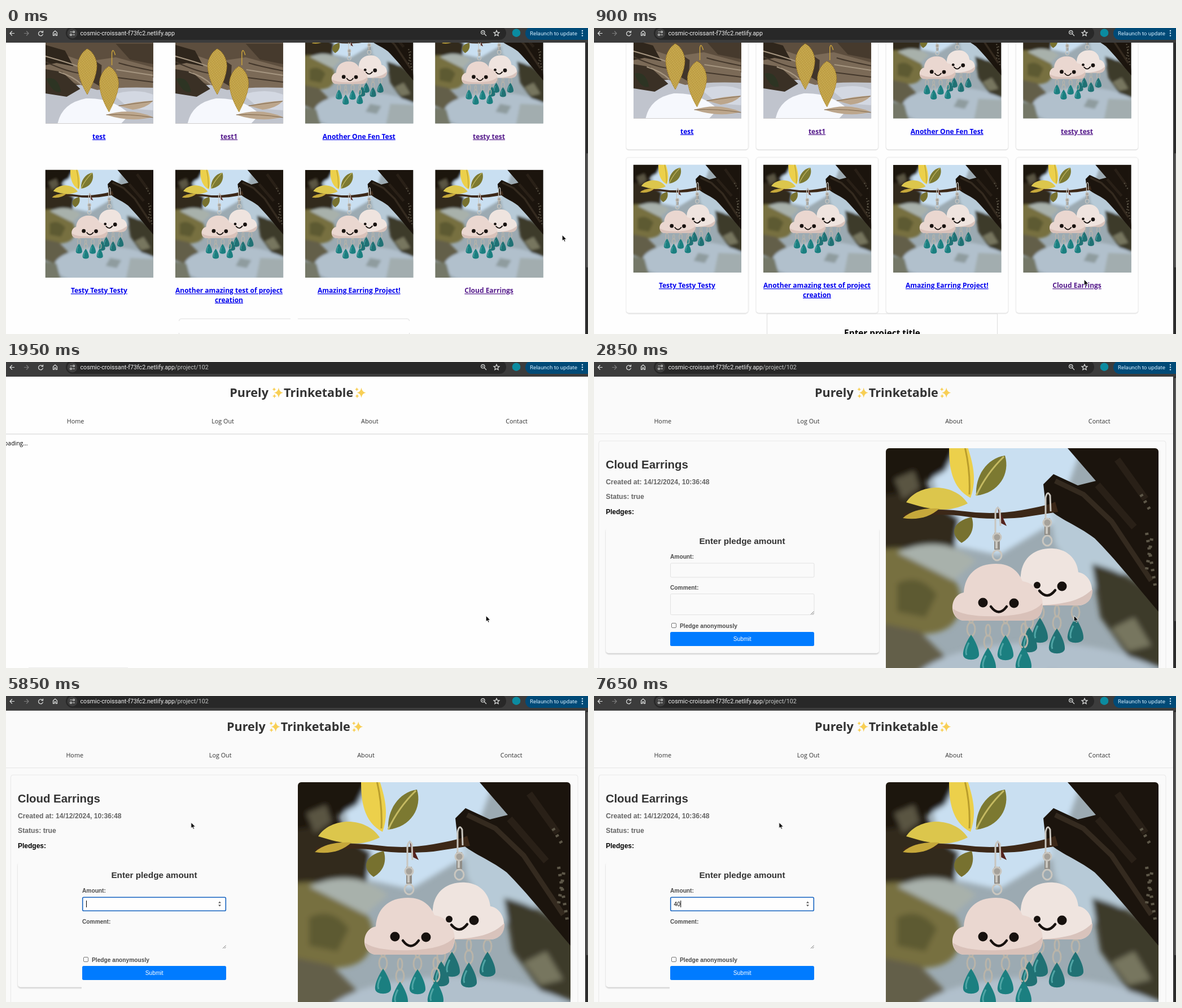
These frames come from a looping animation (1031 by 543 pixels, 8 s). An HTML page:

```html
<!DOCTYPE html>
<html lang="en">
<head>
<meta charset="utf-8">
<title>Earring projects</title>
<style>
html, body { margin: 0; width: 100%; height: 100%; overflow: hidden; background: #fefefe; }
svg { display: block; width: 100%; height: 100%; }
.open { font-family: "Open Sans", sans-serif; }
.arial { font-family: "Liberation Sans", Arial, sans-serif; }
.ui { font-family: Roboto, sans-serif; font-size: 10.7px; }
.mid { text-anchor: middle; }
.b { font-weight: 700; }
.link { font-weight: 700; font-size: 12px; text-decoration: underline; }
.icon { fill: none; stroke: #dfe1e0; stroke-width: 1.2; }

/* 8 s loop, hard cuts: 1% = 80 ms */
.t { animation: 8s step-end infinite; }
#gallery { animation-name: gallery; }
#scroll { animation-name: scroll; }
.frame { animation-name: after-scroll; }
#gap { animation-name: before-scroll; }
#hover { animation-name: hover; }
#status { animation-name: status; }
#loading { animation-name: loading; }
#project { animation-name: project; }
#path { animation-name: path; }
.focus { animation-name: focus; }
#caret { animation-name: caret; }
#four { animation-name: four; }
#zero { animation-name: zero; }
#pointer { animation-name: move; }
#arrow { animation-name: arrow; }
#hand { animation-name: hand; }
#beam { animation-name: beam; }

@keyframes gallery { 0% { opacity: 1 } 24.375% { opacity: 0 } }
@keyframes scroll { 0% { transform: translateY(9px) } 1.875% { transform: none } }
@keyframes after-scroll { 0% { opacity: 0 } 1.875% { opacity: 1 } }
@keyframes before-scroll { 0% { opacity: 1 } 1.875% { opacity: 0 } }
@keyframes hover { 0% { fill: #551a8b } 22.5% { fill: #f00 } }
@keyframes status { 0% { opacity: 0 } 22.5% { opacity: 1 } 35.625% { opacity: 0 } }
@keyframes loading { 0% { opacity: 0 } 24.375% { opacity: 1 } 35.625% { opacity: 0 } }
@keyframes project { 0% { opacity: 0 } 35.625% { opacity: 1 } }
@keyframes path { 0% { opacity: 0 } 24.375% { opacity: 1 } }
@keyframes focus { 0% { opacity: 0 } 61.875% { opacity: 1 } }
@keyframes caret {
  0% { opacity: 0 } 61.875% { opacity: 1 } 67.5% { opacity: 0 } 73.125% { opacity: 1 }
  80.625% { opacity: 0 } 86.25% { opacity: 1 } 91.875% { opacity: 0 }
  93.75% { opacity: 1; transform: translateX(5.7px) }
  95.625% { opacity: 1; transform: translateX(11.2px) }
}
@keyframes four { 0% { opacity: 0 } 93.75% { opacity: 1 } }
@keyframes zero { 0% { opacity: 0 } 95.625% { opacity: 1 } }
@keyframes move {
  0% { transform: translate(985px, 367px) }
  7.5% { transform: translate(970px, 385px) }
  9.375% { transform: translate(918px, 424px) }
  11.25% { transform: translate(868px, 446px) }
  13.125% { transform: translate(850px, 450px) }
  39.375% { transform: translate(805px, 436px) }
  41.25% { transform: translate(610px, 394px) }
  43.125% { transform: translate(400px, 358px) }
  45% { transform: translate(255px, 342px) }
  46.875% { transform: translate(185px, 349px) }
  48.75% { transform: translate(156.5px, 367px) }
  52.5% { transform: translate(169px, 366.5px) }
  54.375% { transform: translate(177.5px, 366.5px) }
  67.5% { transform: translate(196px, 346px) }
  69.375% { transform: translate(252px, 286px) }
  71.25% { transform: translate(308px, 240px) }
  73.125% { transform: translate(327.5px, 224px) }
}
@keyframes arrow { 0% { opacity: 1 } 13.125% { opacity: 0 } 24.375% { opacity: 1 } 48.75% { opacity: 0 } 67.5% { opacity: 1 } }
@keyframes hand { 0% { opacity: 0 } 13.125% { opacity: 1 } 24.375% { opacity: 0 } }
@keyframes beam { 0% { opacity: 0 } 48.75% { opacity: 1 } 67.5% { opacity: 0 } }
</style>
</head>
<body>
<svg viewBox="0 0 1031 543" preserveAspectRatio="none">
<defs>
  <filter id="soft" x="-10%" y="-10%" width="120%" height="120%"><feGaussianBlur stdDeviation="5"/></filter>
  <filter id="shade" x="-5%" y="-5%" width="110%" height="115%"><feDropShadow dx="0" dy="2" stdDeviation="1.3" flood-opacity=".2"/></filter>
  <clipPath id="square"><rect width="483" height="483"/></clipPath>
  <clipPath id="rounded"><rect width="483" height="483" rx="6"/></clipPath>
  <clipPath id="small"><rect width="191.5" height="191.5"/></clipPath>
  <pattern id="lace" width="2.6" height="2.6" patternUnits="userSpaceOnUse" patternTransform="rotate(30)">
    <rect width="2.6" height="2.6" fill="#b8953a"/><circle cx="1" cy="1" r=".8" fill="#ecd579"/><circle cx="2.2" cy="2.1" r=".5" fill="#8a6a1c"/>
  </pattern>

  <g id="drop">
    <g fill="none" stroke="#b9b4a9" stroke-width="3"><ellipse cy="-10" rx="7" ry="12"/><ellipse cy="-31" rx="4" ry="10"/></g>
    <path d="M0 0C6 8 15 26 14 36C13 47-13 47-14 36C-15 26-6 8 0 0Z"/>
    <path d="M-4 14C-9 24-10 32-8 36" fill="none" stroke="#4fa5a5" stroke-width="3"/>
  </g>
  <g id="hook" fill="none" stroke="#c9c6bf" stroke-width="3">
    <path d="M-3 42V6Q0-8 5 2L6 30"/><path d="M0 42V72" stroke="#8f8c86" stroke-width="10"/><path d="M-1 44V70" stroke-width="4"/>
    <circle cy="50" r="7" fill="#a5a19a"/><ellipse cy="82" rx="8" ry="9"/>
  </g>

  <g id="clouds">
    <rect width="483" height="483" fill="#9caab2"/>
    <g filter="url(#soft)">
      <path d="M70-10H350L300 130 200 190 110 170Z" fill="#c9dff1"/>
      <path d="M-10-10H130L105 40 70 60 95 105-10 150Z" fill="#1a130c"/>
      <path d="M-10 85 60 75 130 125 120 190-10 190Z" fill="#322a1b"/>
      <path d="M15 55 50 40 60 70 30 90Z" fill="#5a5443"/>
      <path d="M-10 180Q90 165 130 250 145 330 60 330L-10 320Z" fill="#77703f"/>
      <path d="M20 185Q100 150 160 200L120 235Z" fill="#a8b1ab"/>
      <path d="M20 240Q60 220 90 260L70 300 20 290Z" fill="#5d5a31"/>
      <path d="M-10 310 60 325 105 370 40 420-10 400Z" fill="#635f48"/>
      <ellipse cx="270" cy="430" rx="230" ry="85" fill="#b1c0cc"/>
      <path d="M-10 410 50 420 70 493H-10Z" fill="#757868"/>
      <path d="M290 100Q380 110 430 200L400 260 350 240 300 170Z" fill="#b7cad7"/>
      <path d="M365 205Q430 220 493 270V390L430 370 380 300Z" fill="#3d3b29"/>
      <path d="M400 320 440 300 470 350 430 360Z" fill="#77765f"/>
      <path d="M380 395 493 400V493H360Z" fill="#a2adaf"/>
      <path d="M290 395 340 405 320 440 270 430Z" fill="#8f9c9f"/>
    </g>
    <path d="M322 0H483V290C445 245 405 195 370 160 338 135 296 122 283 100L279 64 297 46 340 66 372 58Z" fill="#1b140d"/>
    <path d="M300 58 350 82 400 130 470 235" fill="none" stroke="#342a1f" stroke-width="9"/>
    <path d="M375 65 440 140M410 20 460 90" fill="none" stroke="#292017" stroke-width="12"/>
    <path d="M452 82 468 110M462 150 478 250M471 160 462 215" fill="none" stroke="#5d5748" stroke-width="6" stroke-dasharray="4 9"/>
    <path d="M32 116Q90 105 140 112T240 110 300 95L305 113 240 123Q180 128 140 121T32 123Z" fill="#3c2818"/>
    <path d="M198 103 214 138 202 132Z" fill="#54231d"/>
    <path d="M150 88C115 70 112 30 112-2H145C157 35 160 60 150 88Z" fill="#ecd04b"/>
    <path d="M140-2Q150 40 148 82" fill="none" stroke="#b99d2c" stroke-width="3"/>
    <path d="M145 98C105 118 70 106 36 96C58 62 120 60 145 98Z" fill="#dcc64c"/>
    <path d="M95 107Q50 105 30 124 70 130 95 107Z" fill="#c6a83b"/>
    <path d="M160 84C158 50 178 18 211 13C221 45 200 80 160 84Z" fill="#7c7931"/>
    <path d="M160 84Q178 45 209 15" fill="none" stroke="#c5ba62" stroke-width="3"/>
    <path d="M152 122C118 130 112 152 134 168C152 158 158 140 152 122Z" fill="#77712f"/>
    <use href="#hook" x="286" y="82"/><use href="#hook" x="197" y="108"/>
    <g fill="#207174">
      <use href="#drop" x="254" y="318"/><use href="#drop" x="273" y="301"/>
      <use href="#drop" x="303" y="320"/><use href="#drop" x="336" y="301"/>
    </g>
    <path d="M250 279C234 264 237 240 239 225C242 190 270 176 297 178C325 180 339 200 341 220C363 224 371 252 361 268C356 276 348 279 340 279Z" fill="#efe4df"/>
    <path d="M262 279C330 278 350 265 366 250 367 272 352 279 340 279Z" fill="#d8c3bc"/>
    <g fill="#1b7f80">
      <use href="#drop" x="151" y="331"/><use href="#drop" x="181" y="354"/>
      <use href="#drop" x="212" y="332"/><use href="#drop" x="244" y="352"/>
    </g>
    <path d="M140 306C112 306 110 262 138 256C140 225 160 205 195 205C220 205 235 218 242 236C262 238 285 262 276 290C272 302 262 306 250 306Z" fill="#ead7d0"/>
    <path d="M119 285Q140 300 200 298T277 275Q279 306 250 306H140Q122 306 119 285Z" fill="#d9c1b9"/>
    <g fill="#17110e"><circle cx="172" cy="274" r="8.5"/><circle cx="227" cy="275" r="8.5"/><circle cx="312" cy="245" r="8.5"/><circle cx="268" cy="243" r="6"/></g>
    <path d="M186 281Q200 300 214 281M272 253Q286 270 300 252" fill="none" stroke="#17110e" stroke-width="4.5" stroke-linecap="round"/>
  </g>

  <path id="gold" d="M0-40C9-36 17-23 17-9C16 10 7 27 0 41C-8 27-16 10-17-9C-17-23-8-36 0-40Z" fill="url(#lace)" stroke="#a47d22" stroke-width=".7"/>
  <g id="leaves" clip-path="url(#small)">
    <rect width="191.5" height="191.5" fill="#5d4e3e"/>
    <path d="M0 130Q60 120 110 122L191.5 110V191.5H0Z" fill="#c0c4cd"/>
    <path d="M22 191Q30 155 72 147 118 145 150 175L135 191Z" fill="#f6f8fd"/>
    <path d="M120 140Q160 128 191 140V168L150 165Z" fill="#d3d8e2"/>
    <path d="M0 58 70 82 125 74 191 92V128Q130 126 92 132L40 116 0 122Z" fill="#7b6a57"/>
    <path d="M0 95 30 100 62 130 38 144 0 138Z" fill="#3a3025"/>
    <path d="M125 50H191V86L150 78Z" fill="#463a2d"/>
    <path d="M0 52 35 62 50 90 20 84 0 88Z" fill="#2f261c"/>
    <path d="M88 80 100 88 98 126 84 118Z" fill="#41352a"/>
    <g fill="none" stroke="#a69681" stroke-width="2"><path d="M0 72Q50 86 62 92M126 96 191 106M24 100Q50 108 64 122"/></g>
    <g fill="none" stroke="#43372b" stroke-width="2"><path d="M0 82Q40 100 60 102M130 84Q150 90 191 98M128 110 191 118"/></g>
    <path d="M2 112Q22 106 28 135 14 140 2 112Z" fill="#2d3423"/>
    <path d="M108 176Q150 163 191 180 150 190 108 176ZM130 160Q160 152 191 151 180 164 155 167Z" fill="#bca68c"/>
    <path d="M108 176Q150 174 191 181M130 160 190 152" fill="none" stroke="#7e664a"/>
    <path d="M118 88V66Q120 56 124 70" fill="none" stroke="#c8a23b" stroke-width="1.5"/>
    <use href="#gold" x="74.5" y="99"/><use href="#gold" x="113" y="130"/>
  </g>

  <path id="star" d="M0-9Q1.2-1.2 8 0Q1.2 1.2 0 9Q-1.2 1.2-8 0Q-1.2-1.2 0-9Z"/>
  <g id="sparkle" fill="#f8cf55">
    <use href="#star" x="12" y="54.5"/><use href="#star" transform="translate(4 48.5) scale(.42)"/><use href="#star" transform="translate(4.5 60.5) scale(.45)"/>
  </g>
  <g id="brand" class="open b" font-size="21.6" fill="#333">
    <text x="465" y="62" text-anchor="end">Purely</text><use href="#sparkle" x="471"/>
    <text x="492" y="62">Trinketable</text><use href="#sparkle" x="617.5"/>
  </g>
</defs>

<g id="gallery" class="t open">
  <rect y="26" width="1031" height="517" fill="#fefefe"/>
  <g id="scroll" class="t">
    <g class="frame t">
      <path d="M306.5 560V507H714.5V560" fill="none" stroke="#dcdcdc"/>
      <text x="510.5" y="547" class="mid b" font-size="15.3">Enter project title</text>
    </g>
    <path id="gap" class="t" d="M306.5 511Q306.5 507 310 507H504M517 507H711Q714.5 507 714.5 511M306.5 532V540M714.5 532V540" fill="none" stroke="#ddd"/>
    <g id="cards"></g>
  </g>
  <rect x="1026" y="26" width="5" height="517" fill="#2d2d2d"/>
  <rect x="1028" y="222" width="3" height="203" rx="1.5" fill="#595959"/>
</g>

<g id="loading" class="t open" opacity="0">
  <rect y="26" width="1031" height="517" fill="#fefefe"/>
  <use href="#brand"/>
  <g class="mid" font-size="10.8" fill="#333">
    <text x="123" y="108.5">Home</text><text x="384" y="108.5">Log Out</text><text x="644.3" y="108.5">About</text><text x="904.5" y="108.5">Contact</text>
  </g>
  <rect y="127" width="1031" height="1.5" fill="#e0e0e0"/>
  <text x="38.5" y="148" text-anchor="end" font-size="10.4">Loading...</text>
</g>
<rect id="status" class="t" x="40" y="542" width="176" height="1" fill="#ececec" opacity="0"/>

<g id="project" class="t arial" opacity="0">
  <rect y="26" width="1031" height="517" fill="#fafafa"/>
  <use href="#brand" x="-5.3"/>
  <g class="mid open" font-size="10.8" fill="#333">
    <text x="121.7" y="108.5">Home</text><text x="379.7" y="108.5">Log Out</text><text x="637.5" y="108.5">About</text><text x="895.2" y="108.5">Contact</text>
  </g>
  <rect y="127" width="1026" height="1" fill="#e6e6e6"/>
  <rect x="8.5" y="140" width="1004.5" height="430" rx="4" fill="#fafafa" stroke="#e8e8e8"/>
  <rect x="21" y="294" width="484" height="222.5" rx="5" fill="#fafafa" filter="url(#shade)"/>
  <g fill="#fafafa" stroke="#e2e2e2"><rect x="135.5" y="357" width="254.5" height="25" rx="2"/><rect x="135.5" y="411.5" width="254.5" height="37" rx="2"/></g>
  <rect class="focus t" x="134" y="153" width="383" height="390" fill="#fafafa"/>
  <g class="b">
    <text x="20.7" y="188.5" font-size="20.4" fill="#333">Cloud Earrings</text>
    <g font-size="12.2" fill="#666"><text x="21" y="216.5">Created at: 14/12/2024, 10:36:48</text><text x="21" y="243">Status: true</text></g>
    <text x="21" y="269.5" font-size="12">Pledges:</text>
    <text x="262.5" y="323.3" class="mid" font-size="15.3" fill="#333">Enter pledge amount</text>
    <g font-size="10.2" fill="#4c4c4c"><text x="135" y="349">Amount:</text><text x="135" y="404">Comment:</text><text x="152" y="472">Pledge anonymously</text></g>
  </g>
  <path d="M384 448 389.5 442.5M387 448 389.5 445.5" stroke="#777"/>
  <rect x="137.5" y="463.5" width="8" height="8" rx="1.5" fill="#fff" stroke="#767676"/>
  <rect x="135" y="479" width="255" height="25" rx="2.5" fill="#007bff"/>
  <text x="262.7" y="495" class="mid" font-size="10.2" fill="#fff">Submit</text>
  <g class="focus t">
    <rect x="135.7" y="357.2" width="253.6" height="24" rx="2" fill="#fefefe" stroke="#1764c0" stroke-width="1.6"/>
    <path d="M376 367.5 378.5 364.5 381 367.5ZM376 370.5 378.5 373.5 381 370.5Z" fill="#555"/>
  </g>
  <g font-size="10.2"><text id="four" class="t" x="141.5" y="373" opacity="0">4</text><text id="zero" class="t" x="147.2" y="373" opacity="0">0</text></g>
  <rect id="caret" class="t" x="142" y="363" width="1" height="12" opacity="0"/>
  <g transform="translate(517 153)"><use href="#clouds" clip-path="url(#rounded)"/></g>
  <rect x="1026" y="26" width="5" height="517" fill="#2d2d2d"/>
  <rect x="1028" y="28" width="3" height="432" rx="1.5" fill="#595959"/>
</g>

<g id="toolbar" class="ui">
  <rect width="1031" height="26" fill="#3c3c3c"/>
  <rect x="106" y="-3" width="780" height="24" rx="12" fill="#282828"/>
  <g class="icon">
    <path d="M15 9.5H7M10.8 5.5 7 9.5 10.8 13.5"/>
    <path d="M32 9.5H40M36.2 5.5 40 9.5 36.2 13.5" stroke="#7c7c7c"/>
    <path d="M64.8 7.5A4 4 0 1 0 65.5 10.5M65.5 4.8V8H62.3"/>
    <path d="M83.5 8.2 87 5 90.5 8.2V13.5H88.3V10.3H85.7V13.5H83.5Z"/>
    <circle cx="117.5" cy="9.5" r="9" fill="#3e3e3e" stroke="none"/>
    <path d="M113.5 7H117M118 12H122"/><circle cx="120" cy="7" r="1.5"/><circle cx="115" cy="12" r="1.5"/>
    <circle cx="844.8" cy="7.8" r="3.2"/><path d="M847.2 10.2 851 14M843.3 7.8H846.3"/>
    <path d="M869 4.3 870.4 7.6 874 8 871.3 10.3 872.1 13.8 869 12 865.9 13.8 866.7 10.3 864 8 867.6 7.6Z"/>
  </g>
  <circle cx="904" cy="8.7" r="7.3" fill="#0b8ba0"/>
  <text x="131.5" y="13" fill="#f1f1f1">cosmic-croissant-f73fc2.netlify.app</text>
  <text id="path" class="t" x="299" y="13" fill="#c5c7c6" opacity="0">/project/102</text>
  <rect x="920" y="-2" width="125" height="23" rx="11.5" fill="#004a77"/>
  <text x="928" y="13" font-size="9.8" fill="#d3ecfd">Relaunch to update</text>
  <g fill="#d3ecfd"><circle cx="1021" cy="5" r="1.2"/><circle cx="1021" cy="9.3" r="1.2"/><circle cx="1021" cy="13.6" r="1.2"/></g>
</g>

<g id="pointer" class="t">
  <path id="arrow" class="t" d="M.3.3V10.7L2.7 8.6 4.4 12.3 6.1 11.5 4.5 8H7.8Z" fill="#000" stroke="#fff" stroke-width=".8"/>
  <path id="hand" class="t" opacity="0" d="M-.5 7V1.5Q.5.3 1.5 1.5V4.5Q2.5 3.7 3.5 4.8 4.5 4.2 5.2 5.2 6.5 4.8 6.7 6.2V8.5L5.5 12H.5L-2.8 7.5Q-2.5 5.8-.5 7ZM1.7 7.5V10M3.3 7.5V10" fill="#fff" stroke="#222" stroke-width=".8"/>
  <path id="beam" class="t" opacity="0" d="M-3-7Q0-7 0-5Q0-7 3-7M0-5V5M-3 7Q0 7 0 5Q0 7 3 7M-1.5 1H1.5" fill="none" stroke="#222"/>
</g>
</svg>
<script>
const blue = "#0000ee", purple = "#551a8b";
const projects = [
  ["test", blue, "leaves"], ["test1", purple, "leaves"], ["Another One Fen Test", blue], ["testy test", purple],
  ["Testy Testy Testy", blue], ["Another amazing test of project|creation", blue],
  ["Amazing Earring Project!", blue], ["Cloud Earrings", purple]
];

function card([title, color, photo = "clouds"], i) {
  const firstRow = i < 4;
  const x = 56.5 + 230.25 * (i % 4), y = firstRow ? -44 : 229.5, height = firstRow ? 260 : 276.5;
  const picture = photo === "clouds"
    ? `<g transform="scale(.3965)"><use href="#clouds" clip-path="url(#square)"/></g>`
    : `<use href="#leaves"/>`;
  const lines = title.split("|").map((line, n) =>
    `<text x="108.3" y="${231.7 + 16.4 * n}" class="link mid">${line}</text>`).join("");
  const hover = i === 7 ? 'id="hover" class="t"' : "";
  return `<g transform="translate(${x} ${y})">
    <g class="frame t">
      <rect y="1" width="217" height="${height}" rx="5" fill="#d4d4d4"/>
      <rect width="217" height="${height}" rx="5" fill="#fefefe" stroke="#e4e4e4"/>
    </g>
    <g transform="translate(13 13)">${picture}</g>
    <g ${hover} fill="${color}">${lines}</g>
  </g>`;
}

document.getElementById("cards").innerHTML = projects.map(card).join("");
</script>
</body>
</html>
```
